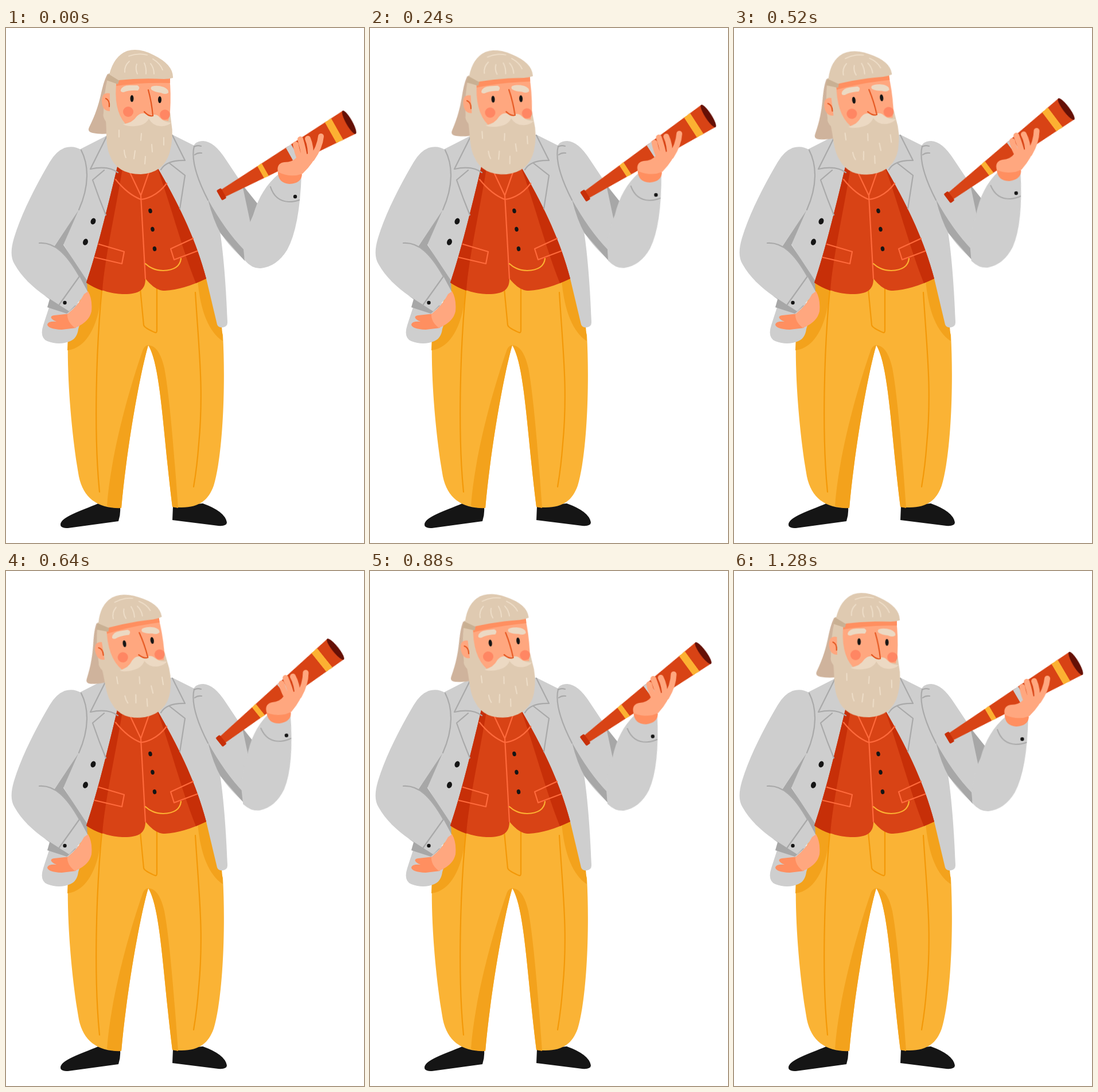
These frames come from a looping animation (624x898 px, 1320 ms). An HTML page without scripts:

```html
<!DOCTYPE html>
<html lang="en">
<head>
<meta charset="utf-8">
<title>Man with a spyglass</title>
<style>
html, body { margin: 0; width: 100%; height: 100%; overflow: hidden; background: #fff; }
svg { display: block; width: 100%; height: 100%; }

.coat { fill: #cecece; }
.fold { fill: #a7a7a7; }
.seam { stroke: #a9a9a9; }
.vest { fill: #d84315; }
.vest-shade { fill: #c72f08; }
.stitch { stroke: #ff6a3c; }
.trousers { fill: #fab335; }
.trousers-shade { fill: #f3a21c; }
.crease { stroke: #f39808; }
.skin { fill: #ffa77f; }
.skin-shade { fill: #ff8f60; }
.hair { fill: #dfcab1; }
.hair-shade { fill: #cfb39c; }
.hair-light { fill: #ecd9c3; }
.strand { stroke: #efdfca; }
.feature { stroke: #e4561f; }
.black { fill: #151515; }
.gold { fill: #fcb132; }
.line { fill: none; stroke-width: 2.2; stroke-linecap: round; stroke-linejoin: round; }
.thin { stroke-width: 1.8; }
.finger { fill: none; stroke: #ffa77f; stroke-linecap: round; stroke-width: 10; }

/* One shared swing; each part sets its own pivot and reach. */
.swing { animation: swing 1320ms infinite; }
.head { transform-origin: 237px 207px; --far: -9.6deg; --near: -.43deg; }
.arm { transform-origin: 428px 432px; --far: -6.5deg; --near: -.29deg; }
.scope { transform-origin: 414px 297px; --far: -9.9deg; --near: -.44deg; }
@keyframes swing {
  0% { transform: rotate(0deg); animation-timing-function: steps(17); }
  51.5152% { transform: rotate(var(--far)); animation-timing-function: steps(16); }
  100% { transform: rotate(var(--near)); }
}
</style>
</head>
<body>
<svg viewBox="0 0 624 898">
  <g id="legs">
    <path class="black" d="M161 829C130 842 95 853 95 866Q95 872 108 872L196 860Q200 848 199 836ZM291 834L290 858L370 868Q385 869 385 862Q382 843 343 829Z"/>
    <path class="trousers" d="M140 438L108 540C106 620 116 720 127 782C135 820 160 838 201 837C209 745 231 612 248 553C270 590 273 700 290 835C333 840 352 826 362 798C378 745 383 625 378 535L349 430Z"/>
    <path class="trousers-shade" d="M248 553C231 612 209 745 201 837Q186 838 176 833C182 750 211 640 239 560Q243 553 248 553ZM248 553C270 590 273 700 290 835L300 837C293 740 285 640 276 593Q267 554 248 553Z"/>
    <path class="trousers-shade" d="M107 562C142 558 163 515 167 455L140 440L108 540ZM334 440C338 485 350 528 378 546L376 520L349 430Z"/>
    <path class="line crease" d="M167 457C157 560 153 710 163 809M330 461C336 560 345 630 336 725Q333 765 327 800M234 455L240 518Q241 523 260 531Q263 532 263 527V453"/>
  </g>

  <g id="coat">
    <path class="coat" d="M78 478L65 518Q58 540 72 546Q93 554 112 546Q124 541 126 525L140 480Z"/>
    <path class="coat" d="M177 187L128 212L100 377L141 444L200 300H270L349 437L368 517Q370 523 378 522Q386 521 386 513C384 460 380 400 373 355L350 210L328 205L290 186Z"/>
    <path class="fold" d="M128 314L84 381L130 440L142 462L141 440L100 378Z"/>
    <path class="fold" d="M68 467L76 473L72 487L106 498L122 484Z"/>
  </g>

  <g id="vest">
    <path class="vest" d="M195 238C180 300 160 385 140 444C163 459 190 464 206 464C232 464 243 457 243 437C254 450 264 458 277 458Q310 456 349 437C331 368 300 305 262 240Z"/>
    <path class="vest-shade" d="M195 238C180 300 160 385 140 444Q153 453 168 458C172 400 193 310 204 238ZM262 240C300 305 331 368 349 437L331 445C305 380 285 300 262 240Z"/>
    <path class="line stitch" d="M191 264Q212 290 235 299Q262 295 280 271M216 252L235 292L249 252M235 292L243 437M162 377L206 390L202 411L155 400M326 367L287 385L293 404L333 389"/>
    <path class="line" stroke="#fcb132" d="M243 411Q256 423 274 423Q303 422 305 402"/>
    <g class="black">
      <ellipse cx="251.5" cy="319" rx="3.2" ry="4.2" transform="rotate(-12 251 319)"/>
      <ellipse cx="255.5" cy="351" rx="3.2" ry="4.2" transform="rotate(-12 255 351)"/>
      <ellipse cx="259" cy="385" rx="3.2" ry="4.2" transform="rotate(-12 259 385)"/>
      <ellipse cx="152" cy="337" rx="4.3" ry="5.7" transform="rotate(20 152 337)"/>
      <ellipse cx="138.5" cy="373" rx="4.3" ry="5.7" transform="rotate(20 138 373)"/>
    </g>
    <path class="line seam" d="M176 188L147 246Q178 239 195 252M171 248L151 265Q162 297 174 326M290 187L312 231Q280 230 270 247M284 235L312 257L303 315"/>
  </g>

  <g id="resting-arm">
    <path class="coat" d="M132 213Q118 204 102 209Q87 215 76 234C50 278 27 324 14 366C8 386 8 401 15 412C27 434 47 452 68 467L110 494L143 461L128 433Q109 396 84 381L127 317C144 276 146 238 132 213Z"/>
    <path class="line seam" d="M131 213C144 238 146 274 127 317M58 375C85 373 106 394 128 433L93 482"/>
    <circle class="black" cx="102.5" cy="479" r="3.2"/>
    <path class="skin-shade" d="M112 498L84 501Q77 502 79 506Q82 510 88 512Q73 511 72 517Q73 525 97 526L122 523Z"/>
    <path class="skin" d="M143 459Q151 473 149 494Q145 513 120 523Q106 512 107 499Q126 484 136 464Z"/>
  </g>

  <g id="raised-upper-arm">
    <path class="coat" d="M326 214Q325 197 344 197Q363 198 383 229L413 274L438 306L428 345L415 404Q382 374 370 350L352 300Q322 248 326 214Z"/>
    <path class="fold" d="M412 274L438 306L426 340ZM352 299Q361 335 374 358L416 406L414 386Q382 353 352 299Z"/>
    <path class="line seam" d="M328 206Q320 238 352 300M328 207Q333 204 340 206M329 221Q334 217 341 218"/>
  </g>

  <g class="swing arm">
    <path class="coat" d="M476 254C454 272 440 295 431 326Q417 353 416 384V405Q429 420 444 419Q472 416 490 387Q512 347 515 255Z"/>
    <path class="line seam" d="M461 277Q469 302 493 303Q504 303 511 300"/>
    <circle class="black" cx="504" cy="294" r="3.2"/>
  </g>

  <g class="swing scope">
    <g transform="translate(376 289.6) rotate(-29.4)">
      <path class="vest" d="M0 -7L256 -23V23L0 7Z"/>
      <rect class="vest-shade" x="-5" y="-10" width="9" height="20" rx="2"/>
      <path class="gold" d="M78 -12L87 -12.5V12.5L78 12ZM218 -20.7L231 -21.5V21.5L218 20.7Z"/>
      <path class="coat" d="M137 -15.6L148 -16.3V16.3L137 15.6Z"/>
      <ellipse cx="255" rx="5.5" ry="23.3" fill="#651006"/>
    </g>
  </g>

  <g class="swing arm">
    <path class="skin-shade" d="M474 247Q472 270 494 272Q515 271 516 255L500 242Z"/>
    <path class="skin" d="M474 251Q471 236 485 234Q500 234 507 225L544 214Q537 235 517 254Q496 262 474 251Z"/>
    <path class="finger" d="M505 203Q507 217 514 232M513 194Q518 210 521 230M526 193Q532 207 531 228M549 189Q547 208 533 228"/>
  </g>

  <g class="swing head">
    <path class="hair-shade" d="M177 80C164 104 168 128 145 173Q141 181 151 183Q164 186 180 184L196 92Z"/>
    <path class="hair" d="M178 84Q170 115 170 148Q168 155 174 163C176 180 173 204 181 222Q193 255 235 255Q274 253 285 218Q293 190 288 164L284 130L220 84Z"/>
    <path class="skin" d="M193 90L285 87Q288 112 286 146L283 162L268 160L249 152L228 160L208 167Q186 142 193 90Z"/>
    <path class="skin-shade" d="M193 88L286 86V96Q232 95 192 101Z"/>
    <path class="skin" d="M181 114Q167 111 167 128Q168 145 181 145Z"/>
    <path class="line feature" d="M174 123Q181 126 180 137"/>
    <path fill="#c9b093" d="M179 79L198 89L195 98L175 91Z"/>
    <path class="hair" d="M180 81Q188 49 211 40Q232 34 257 47Q292 64 291 87Q284 89 275 89Q234 87 196 91Z"/>
    <path class="line thin strand" d="M214 49Q230 43 246 47M215 58Q206 66 207 77M228 63Q225 71 229 80M241 61Q245 70 244 80M252 62Q258 70 258 80M256 54Q269 62 273 73"/>
    <path class="hair-light" d="M200 108Q203 100 215 100L229 100Q235 103 230 109Q215 108 205 112Q199 112 200 108ZM254 102Q263 99 275 103Q284 107 283 113Q278 117 270 113Q260 112 254 108Q251 105 254 102Z"/>
    <g fill="#ff8663">
      <circle cx="213" cy="146" r="9"/>
      <circle cx="277" cy="151" r="8.8"/>
    </g>
    <g class="black">
      <ellipse cx="219.5" cy="123" rx="3" ry="6"/>
      <ellipse cx="268" cy="125" rx="3" ry="6"/>
    </g>
    <path class="hair-light" d="M204 168Q220 166 228 154Q238 144 249 153Q262 148 268 156Q276 165 288 165Q281 172 268 171Q255 170 249 158Q243 170 225 171Q212 172 204 168Z"/>
    <path class="line feature" d="M248 108Q254 130 256 153Q249 155 241 146"/>
    <path class="line thin strand" d="M197 178V190M236 184L235 196M206 213Q206 220 209 226M225 214L223 228M243 224L242 237M254 203L255 216M275 191V204"/>
  </g>
</svg>
</body>
</html>
```
